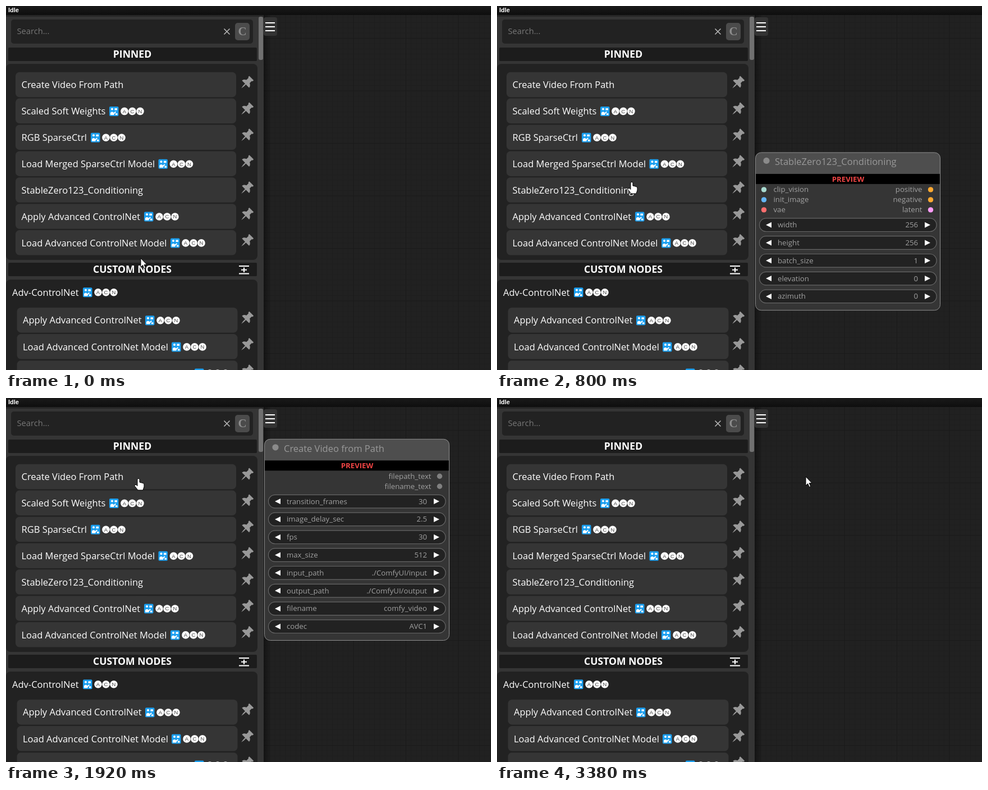
Animation of 864 by 648 pixels, one loop 3450 ms. Source, as an HTML page:

```html
<!DOCTYPE html>
<html lang="en">
<head>
<meta charset="utf-8">
<title>Node sidebar</title>
<style>
html, body { margin: 0; width: 100%; height: 100%; overflow: hidden; background: #212121; }
svg { display: block; width: 864px; height: 648px; font-family: "Open Sans", sans-serif; }
text { white-space: pre; }
.item { font-size: 16.5px; fill: #fff; }
.head { font-size: 17.6px; font-weight: 700; fill: #fff; text-anchor: middle; }
.title { font-size: 16.5px; fill: #999; }
.label { font-size: 13.2px; fill: #a0a0a0; }
.end { text-anchor: end; }
.preview { font-size: 13.2px; font-weight: 700; fill: #ee4444; text-anchor: middle; }
.letter { font: 9.5px "Liberation Sans", Arial, sans-serif; fill: #444; text-anchor: middle; }
</style>
</head>
<body>
<svg id="stage" viewBox="0 0 864 648">
  <defs>
    <pattern id="minor" x="712" y="57" width="9.35" height="9.35" patternUnits="userSpaceOnUse">
      <path d="M0 .5H9.35M.5 0V9.35" stroke="#1e1e1e"/>
    </pattern>
    <pattern id="major" x="712" y="57" width="93.5" height="93.5" patternUnits="userSpaceOnUse">
      <path d="M0 .5H93.5M.5 0V93.5" stroke="#1a1a1a"/>
    </pattern>
    <linearGradient id="shade">
      <stop offset="0" stop-color="#000" stop-opacity=".4"/>
      <stop offset="1" stop-color="#000" stop-opacity="0"/>
    </linearGradient>
    <linearGradient id="bar" x2="0" y2="1">
      <stop offset="0" stop-color="#1a1a1a"/>
      <stop offset="1" stop-color="#0e0e0e"/>
    </linearGradient>
    <path id="pin" transform="rotate(45)" fill="#999"
      d="M-5.5-11H5.5V-8.5L4-7.5V-2.5C7-1 9 1 9 4H1V9L0 14.5L-1 9V4H-9C-9 1-7-1-4-2.5V-7.5L-5.5-8.5Z"/>
    <g id="badge">
      <rect y="-8.5" width="16.5" height="17" rx="2" fill="#1b9ff0"/>
      <circle cx="5" cy="-4" r="2" fill="#fff"/>
      <path d="M2 6.5V2.5Q5-1 8 2.5L11 0L12 1.5L8.5 5V6.5Z" fill="#fff"/>
      <path d="M9.5-5.5H14V-2H9.5ZM11 3.5H14.5V6.5H11Z" fill="#fff"/>
    </g>
  </defs>
  <g id="base"></g>
  <g id="nodes"></g>
  <g id="tip">
    <rect x="245.5" y="157.5" width="138" height="24" fill="#2b2b2b" stroke="#d0d0d0"/>
    <text x="252.5" y="174" font-size="11.4" fill="#fff">Create Video from Path</text>
  </g>
  <g id="cursor" fill="#fff" stroke="#000" stroke-linejoin="round">
    <path id="arrow" d="M0 0V16L3.7 12.5L6.3 18.5L8.8 17.4L6.2 11.6H11Z"/>
    <path id="hand" d="M-2 1.5Q0-1.2 2 1.5V7L8 8.5Q10 9 10 11V15L8 21H-1L-7 13.5Q-7 10.5-4 11.5L-2 13.5Z"/>
  </g>
</svg>
<script>
const $ = id => document.getElementById(id);
const rect = (x, y, w, h, fill, r = 0, more = "") =>
  `<rect x="${x}" y="${y}" width="${w}" height="${h}" rx="${r}" fill="${fill}" ${more}/>`;
const text = (x, y, s, cls, more = "") => `<text x="${x}" y="${y}" class="${cls}" ${more}>${s}</text>`;
const dot = (x, y, r, fill) => `<circle cx="${x}" cy="${y}" r="${r}" fill="${fill}"/>`;
const path = (d, stroke, w = 2) => `<path d="${d}" stroke="${stroke}" stroke-width="${w}" fill="none"/>`;

const STEP = 46.9, FIRST = 140.2;

function badges(x, y) {
  const circles = ["A", "C", "N"].map((c, i) => {
    const cx = x + 27 + 14 * i;
    return dot(cx, y, 6.8, "#fff") + text(cx, y + 3.4, c, "letter");
  });
  return `<use href="#badge" x="${x}" y="${y}"/>` + circles.join("");
}

function entry(x, y, label, badgeX) {
  return rect(x, y - 22.5, 393, 44.5, "#353535", 7) +
    text(x + 10.5, y + 6, label, "item") +
    (badgeX ? badges(badgeX, y + .3) : "") +
    `<use href="#pin" x="0" y="0" transform="translate(429.5 ${y - 4})"/>`;
}

const pinned = [
  ["Create Video From Path"],
  ["Scaled Soft Weights", 184],
  ["RGB SparseCtrl", 151],
  ["Load Merged SparseCtrl Model", 271.5],
  ["StableZero123_Conditioning"],
  ["Apply Advanced ControlNet", 246],
  ["Load Advanced ControlNet Model", 293]
];
const custom = [
  ["Apply Advanced ControlNet", 248],
  ["Load Advanced ControlNet Model", 295],
  ["Load Advanced ControlNet Model (diff)", 336]
];

$("base").innerHTML =
  rect(0, 0, 864, 648, "#212121") +
  rect(459, 16, 405, 632, "url(#minor)") +
  rect(459, 16, 405, 632, "url(#major)") +
  rect(459, 16, 14, 632, "url(#shade)") +
  rect(0, 16, 459, 632, "#353535") +
  rect(0, 16, 459, 3, "#262626") +
  rect(0, 0, 864, 16, "url(#bar)") +
  text(4, 11, "Idle", "", 'font-family="Liberation Sans, Arial, sans-serif" font-size="11" font-weight="700" fill="#fff"') +
  rect(9, 24, 431, 43, "#222", 5) +
  text(19.5, 50, "Search...", "", 'font-size="14.7" fill="#777"') +
  path("M388.5 40.5L398.5 50.5M398.5 40.5L388.5 50.5", "#bbb", 1.5) +
  rect(408, 30, 26, 31, "#4b4b4b", 5) +
  text(421, 52, "C", "", 'font-family="Liberation Serif, Times, serif" font-size="21" font-weight="700" fill="#8c8c8c" text-anchor="middle"') +
  rect(450, 19, 8, 77, "#707070", 3) +
  rect(459, 20, 24, 33, "#333", 4) +
  path("M462 30H479M462 37H479M462 44H479", "#fff") +
  rect(4, 74, 443, 24, "#1c1c1c", 2) +
  text(225, 92.3, "PINNED", "head") +
  rect(0, 103, 448, 349, "#222", 8) +
  pinned.map(([s, b], i) => entry(17, FIRST + STEP * i, s, b)).join("") +
  rect(4, 457, 443, 24, "#1c1c1c", 2) +
  text(225, 475.3, "CUSTOM NODES", "head") +
  path("M415 463H433M415 476.5H433M419 469.8H429M424 465.5V474", "#fff") +
  rect(0, 487, 448, 180, "#222", 8) +
  text(11, 515.5, "Adv-ControlNet", "item") + badges(137, 509.8) +
  custom.map(([s, b], i) => entry(19.5, 559.4 + 47.2 * i, s, b)).join("");

const GREY = "#808080", ORANGE = "#ffa931", TEAL = "#a8dad0", PINK = "#ff9cf9";
const MODEL = "OpenPoseXL2.safetensors";

// Slots are "name" or ["name", colour]; widgets are [name, value].
const nodes = [
  { title: "Create Video from Path", ins: [], outs: ["filepath_text", "filename_text"],
    widgets: [["transition_frames", "30"], ["image_delay_sec", "2.5"], ["fps", "30"], ["max_size", "512"],
      ["input_path", "./ComfyUI/input"], ["output_path", "./ComfyUI/output"],
      ["filename", "comfy_video"], ["codec", "AVC1"]] },
  { title: "ScaledSoftControlNetWeights", ins: [], outs: ["CN_WEIGHTS", "TK_SHORTCUT"],
    widgets: [["base_multiplier", "0.825"], ["flip_weights", "false"]] },
  { title: "ACN_SparseCtrlRGBPreprocessor",
    ins: [["image", "#64b5f6"], ["vae", "#ff6e6e"], ["latent_size", PINK]], outs: ["proc_IMAGE"], widgets: [] },
  { title: "ACN_SparseCtrlMergedLoaderAdvanced", wide: true,
    ins: [null, "sparse_method", "tk_optional"], outs: [["CONTROL_NET", TEAL]],
    widgets: [["sparsectrl_name", MODEL], ["control_net_name", MODEL], ["use_motion", "true"],
      ["motion_strength", "1"], ["motion_scale", "1"]] },
  { title: "StableZero123_Conditioning",
    ins: [["clip_vision", TEAL], ["init_image", "#64b5f6"], ["vae", "#ff6e6e"]],
    outs: [["positive", ORANGE], ["negative", ORANGE], ["latent", PINK]],
    widgets: [["width", "256"], ["height", "256"], ["batch_size", "1"], ["elevation", "0"], ["azimuth", "0"]] },
  { title: "ACN_AdvancedControlNetApply",
    ins: [["positive", ORANGE], ["negative", ORANGE], ["control_net", "#9aaba8"], ["image", "#64b5f6"],
      ["mask_optional", "#81a581"], "timestep_kf", "latent_kf_override", "weights_override"],
    outs: [["positive", ORANGE], ["negative", ORANGE]],
    widgets: [["strength", "1"], ["start_percent", "0"], ["end_percent", "1"]] },
  { title: "ControlNetLoaderAdvanced", wide: true, ins: [null, "tk_optional"], outs: [["CONTROL_NET", TEAL]],
    widgets: [["control_net_name", MODEL]] }
];

function drawNode(n, i) {
  const top = 73.3 + STEP * i, left = 460.5, right = n.wide ? 831.5 : 789.5, w = right - left;
  const rows = Math.max(n.ins.length, n.outs.length);
  const rowY = r => top + 66 + 18 * r;
  const firstWidget = rowY(rows - 1) + 26.8;
  const bottom = n.widgets.length ? firstWidget + 31.8 * (n.widgets.length - 1) + 24.8 : rowY(rows - 1) + 18;

  const slot = (s, r, out) => {
    if (!s) return "";
    const [name, color] = Array.isArray(s) ? s : [s, GREY];
    return dot(out ? right - 17 : 475.5, rowY(r), 4.7, color) +
      text(out ? right - 32 : 492.5, rowY(r) + 4.5, name, out ? "label end" : "label");
  };
  const widget = ([name, value], k) => {
    const y = firstWidget + 31.8 * k;
    return rect(467.5, y - 11.8, w - 13.5, 23.6, "#222", 11.8, 'stroke="#666" stroke-width="1.2"') +
      `<path d="M489 ${y - 5}V${y + 5}L479 ${y}ZM${right - 27.5} ${y - 5}V${y + 5}L${right - 17.5} ${y}Z" fill="#fff"/>` +
      text(500, y + 4.5, name, "label") + text(right - 39.5, y + 4.5, value, "label end");
  };

  return `<g visibility="hidden">` +
    rect(left, top, w, bottom - top, "#353535", 10) +
    `<path d="M${left} ${top + 38}V${top + 10}q0-10 10-10H${right - 10}q10 0 10 10V${top + 38}Z" fill="#4e4e4e"/>` +
    rect(left, top + 38, w, 18, "#000") +
    rect(left, top, w, bottom - top, "none", 10, 'stroke="#8e8e8e"') +
    dot(480, top + 14.5, 5.6, "#8a8a8a") +
    text(495, top + 22.3, n.title, "title") +
    text((left + right) / 2 + .5, top + 52, "PREVIEW", "preview") +
    n.ins.map((s, r) => slot(s, r, false)).join("") +
    n.outs.map((s, r) => slot(s, r, true)).join("") +
    n.widgets.map(widget).join("") + "</g>";
}
$("nodes").innerHTML = nodes.map(drawNode).join("");
const previews = [...$("nodes").children];

// Pointer keys: tick, x, y.
const keys = [
  [0, 240, 449], [8, 240, 358], [17, 240, 257], [21, 237, 206], [24, 236, 169], [25, 236, 161],
  [27, 236, 149], [29, 236, 143], [46, 236, 143], [47, 239, 143], [48, 275, 143],
  [49, 380, 142], [50, 490, 141], [51, 550, 140]
];
const LOOP = 3450, TICKS = 52;

function pointer(tick) {
  const k = Math.max(1, keys.findIndex(key => key[0] >= tick));
  const [t0, x0, y0] = keys[k - 1], [t1, x1, y1] = keys[k];
  const p = (tick - t0) / (t1 - t0);
  return [x0 + (x1 - x0) * p, y0 + (y1 - y0) * p];
}

function render(ms) {
  const t = Math.floor((ms % LOOP) / 10) * 10 + 10;
  const tick = Math.min(TICKS - 1, Math.ceil(t / (LOOP / TICKS)) - 1);
  const [x, y] = pointer(tick);
  const inside = x > 17 && x < 410 && y < 445;
  const hover = inside ? Math.floor((y - FIRST + 23.6) / STEP) : -1;

  previews.forEach((g, i) => g.setAttribute("visibility", i === hover ? "visible" : "hidden"));
  $("tip").setAttribute("visibility", tick >= 37 && tick < 48 ? "visible" : "hidden");
  $("cursor").setAttribute("transform", `translate(${Math.round(x)} ${Math.round(y)})`);
  $("hand").setAttribute("visibility", inside ? "visible" : "hidden");
  $("arrow").setAttribute("visibility", inside ? "hidden" : "visible");
}

const start = performance.now();
function loop() {
  render(performance.now() - start);
  requestAnimationFrame(loop);
}
render(0);
requestAnimationFrame(loop);
</script>
</body>
</html>
```
